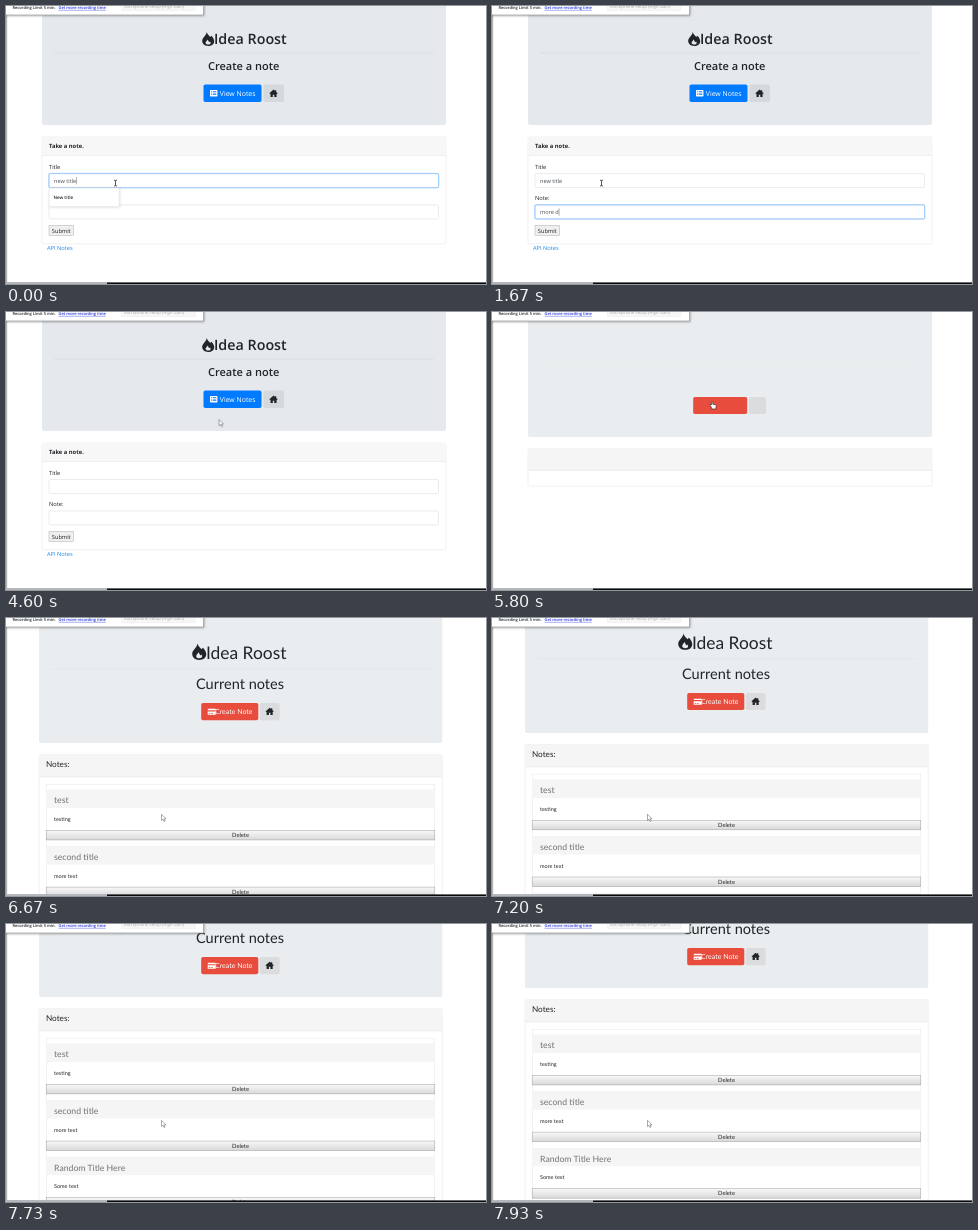
Animation of 480 by 278 pixels, one loop 8000 ms. Source, as an HTML page:

```html
<!DOCTYPE html>
<html lang="en">
<head>
<meta charset="utf-8">
<title>Notes</title>
<style>
  html, body { margin: 0; width: 100%; height: 100%; overflow: hidden; background: #fff; }
  svg { display: block; width: 100%; height: 100%; }
  text { white-space: pre; text-rendering: geometricPrecision; fill: #212529; }
  #form text, #chrome text { font-family: "Open Sans", "Noto Sans", sans-serif; }
  #list text { font-family: Lato, sans-serif; }
</style>
</head>
<body>
<svg id="stage" viewBox="0 0 480 278" preserveAspectRatio="none"></svg>
<script>
const DURATION = 8000, STEP = 1000 / 15;
const LINE = '#e2e2e2';

const rect = (x, y, r, b, fill, extra = '') =>
  `<rect x="${x}" y="${y}" width="${r - x}" height="${b - y}" fill="${fill}" ${extra}/>`;
const text = (x, y, size, value, extra = '') =>
  `<text x="${x}" y="${y}" font-size="${size}" ${extra}>${value}</text>`;
const icon = (x, y, scale, d, fill) =>
  `<path transform="translate(${x} ${y}) scale(${scale})" d="${d}" fill="${fill}" fill-rule="evenodd"/>`;

const FLAME = 'M4.6 0C5 2.1 6.7 3.4 8 5L9.1 3.7C11 5.4 12 7.6 12 9.2C12 12.2 9.5 14 6 14S0 12 0 8.8C0 5.8 3.8 4 4.6 0Z' +
  'M5.4 7.4C4.8 8.8 3.4 9.6 3.4 10.8C3.4 12 4.5 12.6 6 12.6S8.5 11.9 8.5 10.7L7.9 9.4L7 10.3Z';
const HOUSE = 'M4.5 0L6 1.3V.6H7.4V2.5L9 4L8.3 4.8L7.8 4.4V8H5.3V5.6H3.7V8H1.2V4.4L.7 4.8L0 4Z';
const LIST = 'M.7 0H7.3Q8 0 8 .7V6.3Q8 7 7.3 7H.7Q0 7 0 6.3V.7Q0 0 .7 0Z' +
  'M1.2 1.5H2.2V2.3H1.2ZM3 1.5H6.8V2.3H3ZM1.2 3.1H2.2V3.9H1.2ZM3 3.1H6.8V3.9H3ZM1.2 4.7H2.2V5.5H1.2ZM3 4.7H6.8V5.5H3Z';
const CARD = 'M.6 0H8V1.4H0V.6ZM0 2.6H8V6H0ZM1 4.3H2.3V5H1ZM3 4.3H5V5H3Z';

const input = (id, y) => rect(43, y, 432.5, y + 14, '#fff', 'rx="1.4" stroke="#d3d8dd" stroke-width=".5"') +
  `<g id="${id}Focus">` +
  rect(42.7, y - .3, 432.8, y + 14.3, 'none', 'rx="1.8" stroke="#80bdff" stroke-opacity=".4" stroke-width="1.3"') +
  rect(43, y, 432.5, y + 14, 'none', 'rx="1.4" stroke="#80bdff" stroke-width=".5"') + '</g>' +
  text(48, y + 9.2, 5.6, '', `id="${id}Text" style="fill:#495057"`) +
  `<path id="${id}Caret" d="M0 ${y + 3.5}v7.4" stroke="#444" stroke-width=".4"/>`;

const popup = (id, y, value) => `<g id="${id}Popup">` +
  rect(43, y, 113.2, y + 18.8, '#fff', 'rx="1" stroke="#d4d4d4" stroke-width=".5" filter="url(#faint)"') +
  text(47.5, y + 11.2, 4.5, value, 'font-weight="600"') + '</g>';

const formPage = `<g id="form">
  ${rect(36, -10, 440, 119, '#e5e9ed', 'rx="2"')}
  ${icon(196.2, 26, 1, FLAME, '#212529')}
  ${text(208, 38, 14.3, 'Idea Roost', 'font-weight="600"')}
  ${rect(48, 46.8, 428, 47.3, '#cfd3d7')}
  ${text(202, 64.3, 11, 'Create a note', 'font-weight="600"')}
  ${rect(197.5, 78.5, 255.5, 96, '#007bff', 'rx="1.8" id="viewButton"')}
  ${icon(204, 83.9, .93, LIST, '#fff')}
  ${text(213.8, 90.1, 6.9, 'View Notes', 'style="fill:#fff"')}
  ${rect(257.5, 78.5, 278, 96, '#d6d9dc', 'rx="1.8"')}
  ${icon(263.4, 83.6, .92, HOUSE, '#212529')}
  ${rect(36, 131, 440, 237.8, '#fff', `rx="1.5" stroke="${LINE}" stroke-width=".5"`)}
  ${rect(36.2, 131.2, 439.8, 149.4, '#f7f7f7')}
  ${rect(36, 149.2, 440, 149.7, LINE)}
  ${text(43, 142.2, 5.8, 'Take a note.', 'font-weight="700"')}
  ${text(43, 162.8, 5.7, 'Title')}
  ${text(43, 194, 5.7, 'Note:')}
  ${input('title', 167.6)}
  ${input('note', 198.9)}
  ${rect(43, 219.3, 67.4, 229.4, '#efefef', 'stroke="#b0b0b0" stroke-width=".5"')}
  ${text(55.2, 226.5, 5.7, 'Submit', 'text-anchor="middle"')}
  ${text(41, 243.8, 5.7, 'API Notes', 'style="fill:#2387e8"')}
  ${popup('title', 181.9, 'New title')}
  ${popup('note', 213.2, 'more text')}
</g>`;

const note = ([title, body], i) => {
  const y = 172 + i * 56.6;
  return rect(40.2, y, 428.8, y + 50, '#fff', `stroke="${LINE}" stroke-width=".4"`) +
    rect(40.2, y, 428.8, y + 18, '#f5f5f5') +
    text(48, y + 13.4, 8.7, title, 'style="fill:#737373"') +
    text(48, y + 31, 5.5, body) +
    rect(40.2, y + 40.5, 428.8, y + 49.9, 'url(#bevel)', 'stroke="#a0a0a0" stroke-width=".5"') +
    text(234.5, y + 47.2, 5.8, 'Delete', 'text-anchor="middle"');
};
const notes = [['test', 'testing'], ['second title', 'more text'], ['Random Title Here', 'Some text']];

const listPage = `<g id="list">
  ${rect(33, -10, 436.3, 125, '#e9edef', 'rx="2"')}
  ${icon(186.2, 25.5, 1.17, FLAME, '#212529')}
  ${text(200, 41.2, 17.4, 'Idea Roost')}
  ${rect(45, 50.8, 425, 51.2, '#d9dde0')}
  ${text(190, 71, 14.55, 'Current notes')}
  ${rect(195.2, 85, 252.3, 102.2, '#e74c3c', 'rx="1.8"')}
  ${icon(201.7, 90.8, 1, CARD, '#fff')}
  ${text(209, 96.3, 7, 'Create Note', 'style="fill:#fff"')}
  ${rect(253.8, 85, 273.6, 102.2, '#dadcdd', 'rx="1.8"')}
  ${icon(259.5, 89.7, .92, HOUSE, '#212529')}
  ${rect(33, 136.7, 436.3, 400, '#fff', `rx="1.5" stroke="${LINE}" stroke-width=".5"`)}
  ${rect(33.2, 136.9, 436.1, 159, '#f5f5f5')}
  ${rect(33, 158.8, 436.3, 159.3, LINE)}
  ${text(40, 149.2, 8.2, 'Notes:')}
  ${rect(40.2, 166.2, 428.8, 400, '#fff', `stroke="${LINE}" stroke-width=".4"`)}
  ${notes.map(note).join('')}
</g>`;

const loadingPage = `<g id="loading">
  ${rect(36, -10, 440, 125, '#e9edef', 'rx="2"')}
  ${rect(48, 50.8, 428, 51.2, '#dfe3e6')}
  ${rect(201.2, 85, 255.2, 102, '#e74c3c', 'rx="1.8"')}
  ${rect(257, 85, 274, 102, '#dadcdd', 'rx="1.8"')}
  ${rect(36, 136.7, 440, 174, '#fff', `rx="1.5" stroke="${LINE}" stroke-width=".5"`)}
  ${rect(36.2, 136.9, 439.8, 158.4, '#f5f5f5')}
  ${rect(36, 158.2, 440, 158.7, LINE)}
</g>`;

const recorder = `<g id="chrome">
  ${rect(0, 0, .8, 278, '#8c8c8c')}
  ${rect(.8, 0, 1.6, 278, '#ececec')}
  ${rect(0, 276, 101, 278, '#b4b8bc')}
  ${rect(101, 276.4, 480, 278, '#08090b')}
  ${rect(-5, -5, 197.7, 9, '#fff', 'stroke="#858585" stroke-width=".6" filter="url(#soft)"')}
  ${text(6.5, 2.9, 4, 'Recording Limit 5 min.', 'font-weight="600"')}
  ${text(52.5, 2.9, 4, 'Get more recording time', 'font-weight="600" text-decoration="underline" style="fill:#2533dd"')}
  ${rect(115.5, -4, 189, 4.6, '#f7f7f7', 'stroke="#e6e6e6" stroke-width=".4"')}
  ${text(118, 2.1, 4.3, 'Microphone Setup (High Gain)', 'style="fill:#aaa"')}
</g>`;

const pointers = `<g id="pointer">
  <path id="beam" d="M-1.5-2.8Q0-2.8 0-2.2Q0-2.8 1.5-2.8M0-2.3V2.5M-1.5 3Q0 3 0 2.4Q0 3 1.5 3" fill="none" stroke="#111" stroke-width=".7"/>
  <path id="arrow" d="M-1-3V3.2L.5 1.9L1.5 4.2L2.6 3.7L1.6 1.5H3.5Z" fill="#fff" stroke="#555" stroke-width=".5"/>
  <path id="hand" d="M-1.6-3.2Q-.8-4-.2-3.1V-.8L2.6-.2Q3.4.1 3.3 1L2.6 4H-.8L-3-.1Q-3-1-2-.6L-1.6 0Z" fill="#fff" stroke="#222" stroke-width=".6"/>
</g>`;

const shadow = (id, opacity) => `<filter id="${id}" x="-10%" y="-30%" width="120%" height="170%">
  <feDropShadow dx=".5" dy=".6" stdDeviation=".8" flood-opacity="${opacity}"/></filter>`;

document.getElementById('stage').innerHTML = `<defs>
  <linearGradient id="bevel" x2="0" y2="1"><stop stop-color="#f8f8f8"/><stop offset="1" stop-color="#d9d9d9"/></linearGradient>
  ${shadow('soft', .35)}${shadow('faint', .14)}
</defs>` + rect(0, 0, 480, 278, '#fff') + formPage + loadingPage + listPage + recorder + pointers;

const el = id => document.getElementById(id);
const show = (id, on) => el(id).setAttribute('visibility', on ? 'visible' : 'hidden');

// Rows are [time, ...values]
const typing = [[0, ''], [930, 'm'], [1060, 'mo'], [1330, 'mor'], [1460, 'more'], [1660, 'more d'], [2000, 'more'],
  [2130, 'more '], [2260, 'more t'], [2400, 'more te'], [2600, 'more tex'], [2730, 'more text'], [3000, '']];
const pointerPath = [[0, 109.5, 177], [4000, 109.5, 177], [4733, 237, 96], [4800, 237, 96],
  [5200, 221, 93], [6467, 221, 93], [6667, 156.5, 199.3]];
const scrollPath = [[6933, 0], [7000, 1], [7200, 10], [7533, 40], [7800, 56], [7933, 61]];

const stepAt = (rows, t) => rows.filter(row => row[0] <= t).pop()[1];
function valueAt(rows, t, col = 1) {
  const next = rows.findIndex(row => row[0] > t);
  if (next === 0) return rows[0][col];
  if (next < 0) return rows[rows.length - 1][col];
  const a = rows[next - 1], b = rows[next];
  return a[col] + (b[col] - a[col]) * (t - a[0]) / (b[0] - a[0]);
}
const between = (t, from, to) => t >= from && t < to;

function setField(id, value, focus, caretOn) {
  const label = el(id + 'Text');
  label.textContent = value;
  el(id + 'Focus').setAttribute('opacity', focus);
  const x = 48.3 + (value ? label.getComputedTextLength() : 0);
  el(id + 'Caret').setAttribute('transform', `translate(${x} 0)`);
  el(id + 'Caret').setAttribute('opacity', caretOn ? 1 : 0);
}

function draw(now) {
  const t = Math.floor((now % DURATION + 4) / STEP) * STEP + 1;

  const onForm = t < 5660, loading = between(t, 5660, 5860);
  el('form').style.display = onForm ? '' : 'none';
  el('loading').style.display = loading ? '' : 'none';
  el('list').style.display = onForm || loading ? 'none' : '';

  if (onForm) {
    setField('title', t < 3000 ? 'new title' : '', valueAt([[400, 1], [600, 0]], t), t < 330);
    setField('note', stepAt(typing, t), valueAt([[400, 0], [600, 1], [2933, 1], [3133, 0]], t), between(t, 530, 3000));
    show('titlePopup', t < 460);
    show('notePopup', between(t, 930, 1660) || between(t, 2000, 2730));
    el('viewButton').setAttribute('fill', t > 4700 ? '#0069d9' : '#007bff');
  } else {
    el('list').setAttribute('transform', `translate(0 ${-valueAt(scrollPath, t)})`);
  }

  el('pointer').setAttribute('transform',
    `translate(${valueAt(pointerPath, t)} ${valueAt(pointerPath, t, 2)})`);
  const hand = between(t, 4700, 6530);
  show('beam', t < 4060);
  show('hand', hand);
  show('arrow', t >= 4060 && !hand);
}

function loop() {
  draw(performance.now());
  requestAnimationFrame(loop);
}
loop();
</script>
</body>
</html>
```
